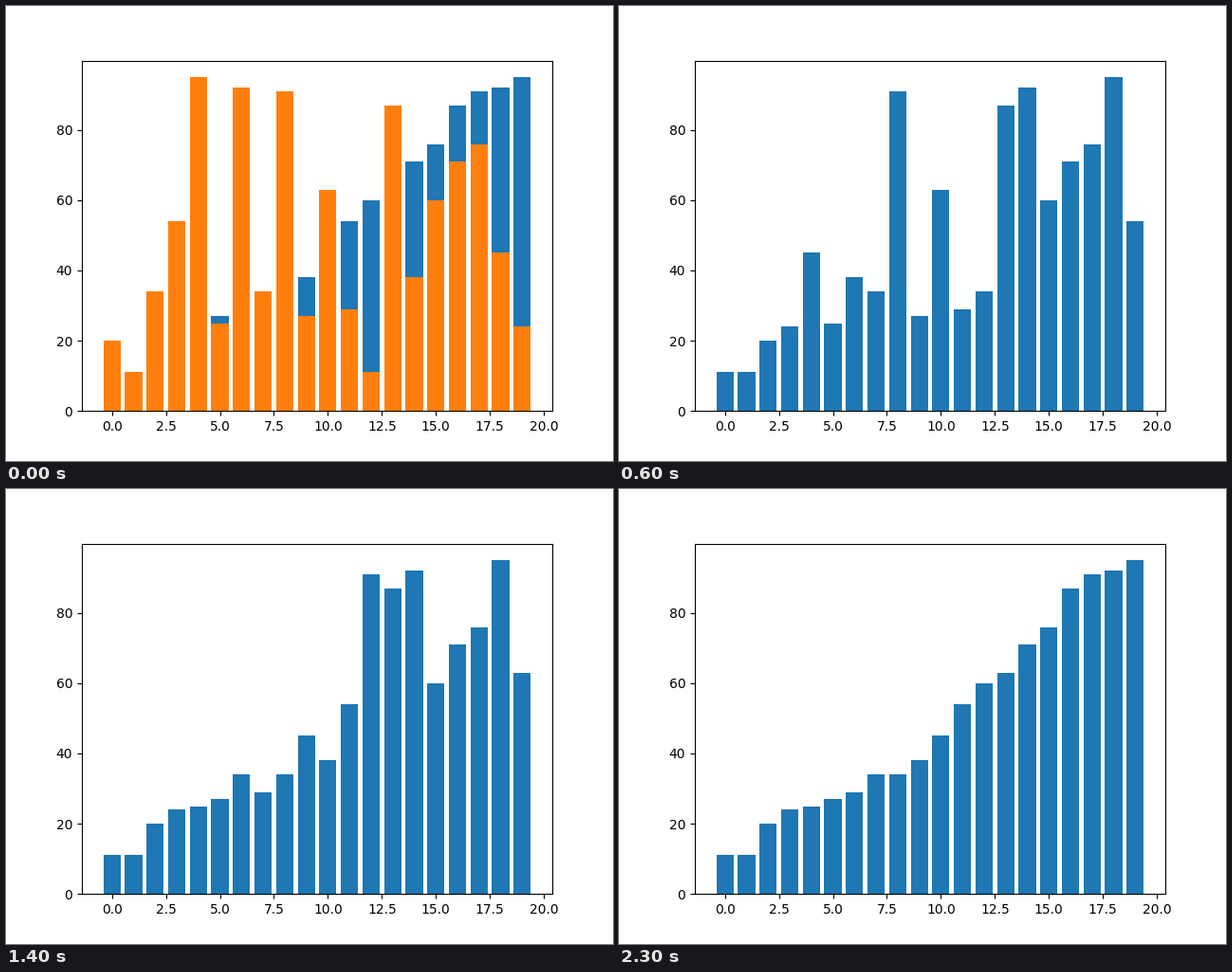
A matplotlib script that plays this animation: 640x480 px, repeating every 2.4 s.

```python
import matplotlib.pyplot as plt
from matplotlib.animation import FuncAnimation

VALUES = [20, 11, 34, 54, 95, 25, 92, 34, 91, 27,
          63, 29, 11, 87, 38, 60, 71, 76, 45, 24]


def swap(a, i, j):
    a[i], a[j] = a[j], a[i]


def quicksort(a, lo, hi):
    """Median-of-three quicksort, yielding a snapshot after each swap."""
    if lo >= hi:
        return
    median = sorted((lo, (lo + hi) // 2, hi), key=lambda k: a[k])[1]
    swap(a, median, hi)
    pivot = a[hi]
    i, j = lo, hi - 1
    while True:
        while i < hi and a[i] < pivot:
            i += 1
        while j > lo and a[j] > pivot:
            j -= 1
        if i >= j:
            break
        swap(a, i, j)
        yield a[:]
        i += 1
        j -= 1
    swap(a, i, hi)
    yield a[:]
    yield from quicksort(a, lo, i - 1)
    yield from quicksort(a, i + 1, hi)


states = [VALUES] + list(quicksort(VALUES[:], 0, len(VALUES) - 1))

fig, ax = plt.subplots(figsize=(6.4, 4.8), dpi=100)
x = range(len(VALUES))
bars = ax.bar(x, states[-1], color="C0")
start = ax.bar(x, VALUES, color="C1")


def update(n):
    # The unsorted values open the loop on top of the sorted ones.
    heights = states[n] if n else states[-1]
    for bar, first, h in zip(bars, start, heights):
        bar.set_height(h)
        first.set_visible(n == 0)
    return [*bars, *start]


anim = FuncAnimation(fig, update, frames=len(states), interval=100,
                     repeat=True, repeat_delay=0, blit=False)
plt.show()
```
